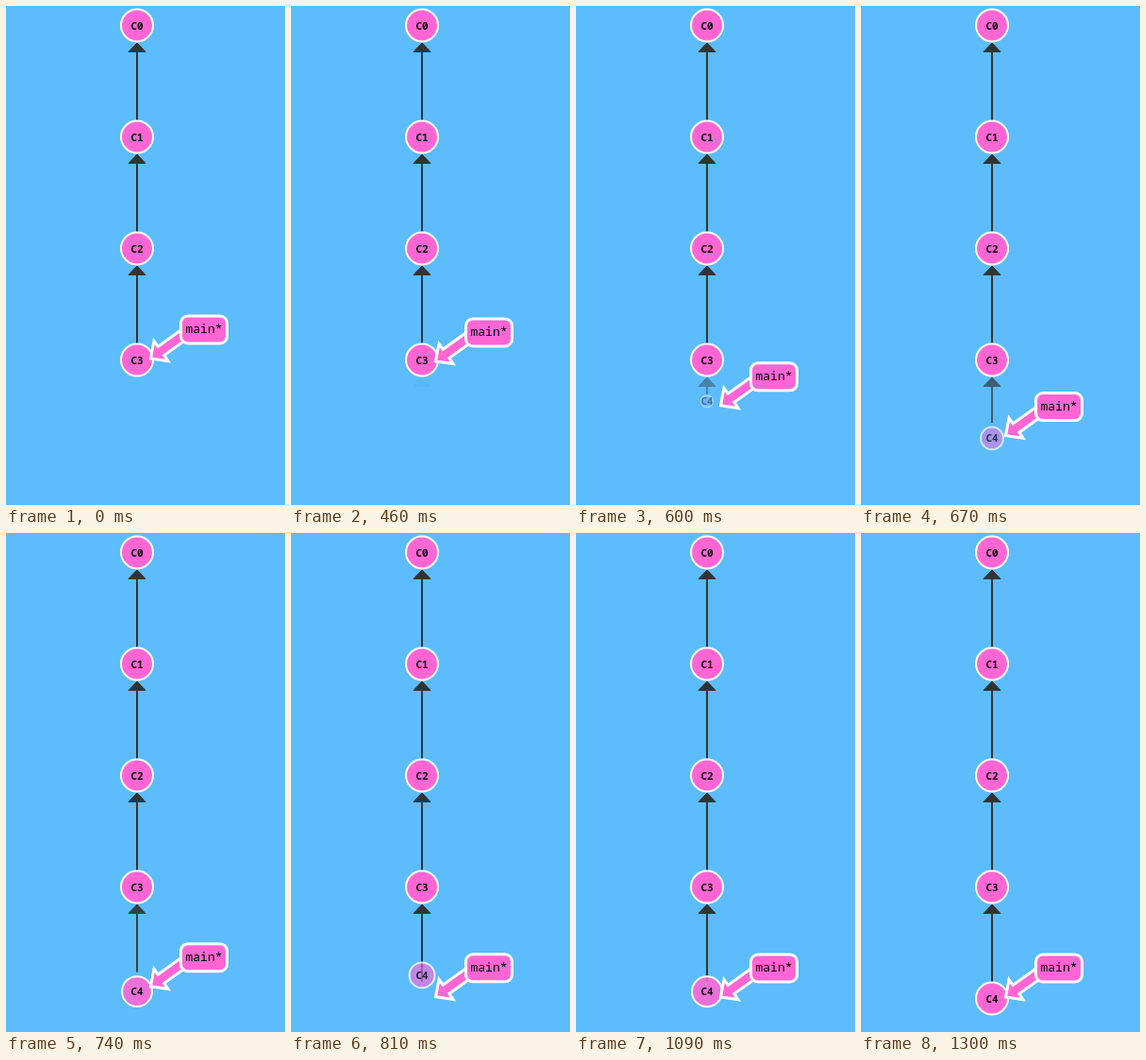
Write an HTML page that moves like this. It is 296 px wide and 528 px high and loops after 2240 ms.

```html
<!DOCTYPE html>
<html lang="en">
<head>
<meta charset="utf-8">
<title>Commit graph</title>
<style>
  html, body { margin: 0; width: 100%; height: 100%; overflow: hidden; background: #5cbcfc; }
  svg { display: block; width: 296px; height: 528px; }
  text { font-family: "Noto Sans Mono", "DejaVu Sans Mono", monospace; text-anchor: middle; fill: #000; }
  .commit circle { fill: #ff66d4; stroke: #fff; stroke-width: 2; }
  .commit text { font-size: 11px; font-weight: 600; }
  .edge { stroke: #333; fill: #333; stroke-linejoin: round; }
  .edge line { stroke-width: 2; }
  .branch path, .branch rect { fill: #ff66d4; stroke: #fff; stroke-width: 3; }
  .branch text { font-size: 13px; }
</style>
</head>
<body>
<svg viewBox="0 0 296 528">
  <g id="edges"></g>
  <g id="commits"></g>
  <g id="branch" class="branch">
    <path d="M153.5 373 L157 354.5 L161.2 360.4 L193.6 337.2 L200.2 346.4 L167.8 369.6 L172 375.7 Z"/>
    <rect x="185.5" y="328" width="49" height="29" rx="7.5"/>
    <text x="210" y="346">main*</text>
  </g>
</svg>
<script>
const LOOP = 2240, FIRST = 460, STEP = 70;
const X = 139, TOP = 20.5, GAP = 118, RADIUS = 17;
const $ = id => document.getElementById(id);

function add(parent, tag, attrs) {
  const el = document.createElementNS("http://www.w3.org/2000/svg", tag);
  set(el, attrs);
  return parent.appendChild(el);
}

function set(el, attrs) {
  for (const key in attrs) el.setAttribute(key, attrs[key]);
}

function addCommit(i) {
  const y = TOP + GAP * i;
  const group = add($("commits"), "g", { class: "commit" });
  const circle = add(group, "circle", { cx: X, cy: y, r: RADIUS });
  const label = add(group, "text", { x: X, y: y + 4 });
  label.textContent = "C" + i;
  return { group, circle, label };
}

function addEdge(i) {
  const y = TOP + GAP * i + 18.5;
  const group = add($("edges"), "g", { class: "edge" });
  const line = add(group, "line", { x1: X, x2: X, y1: y + 9, y2: y + 82 });
  add(group, "path", { d: `M${X} ${y} l9 9.5 h-18 Z` });
  return { group, line };
}

const commits = [0, 1, 2, 3, 4].map(addCommit);
const edges = [0, 1, 2, 3].map(addEdge);
const commit = commits[4], edge = edges[3];
const parentY = TOP + GAP * 3;

const clamp = v => Math.min(1, Math.max(0, v));
const easeInOut = v => (1 - Math.cos(Math.PI * v)) / 2;

function bounce(v) {
  const k = 7.5625, d = 2.75;
  if (v < 1 / d) return k * v * v;
  if (v < 2 / d) return k * (v - 1.5 / d) ** 2 + 0.75;
  if (v < 2.5 / d) return k * (v - 2.25 / d) ** 2 + 0.9375;
  return k * (v - 2.625 / d) ** 2 + 0.984375;
}

function draw(ms) {
  const raw = ms % LOOP;
  const t = raw < FIRST ? 0 : FIRST + Math.floor((raw - FIRST) / STEP) * STEP;
  const move = easeInOut(clamp((t - 420) / 400));
  const grow = bounce(clamp((t - 414) / 840));
  const y = parentY + GAP * grow;

  set(commit.group, { opacity: grow });
  set(commit.circle, { cy: y, r: RADIUS * grow, "fill-opacity": grow });
  set(commit.label, { y: y + 4 });
  set(edge.group, { opacity: move });
  set(edge.line, { y2: Math.max(parentY + 28, 365 + 110 * move) });
  set($("branch"), { transform: `translate(0 ${GAP * move})` });
}

const start = performance.now();
function tick() {
  draw(performance.now() - start);
  requestAnimationFrame(tick);
}
tick();
</script>
</body>
</html>
```
